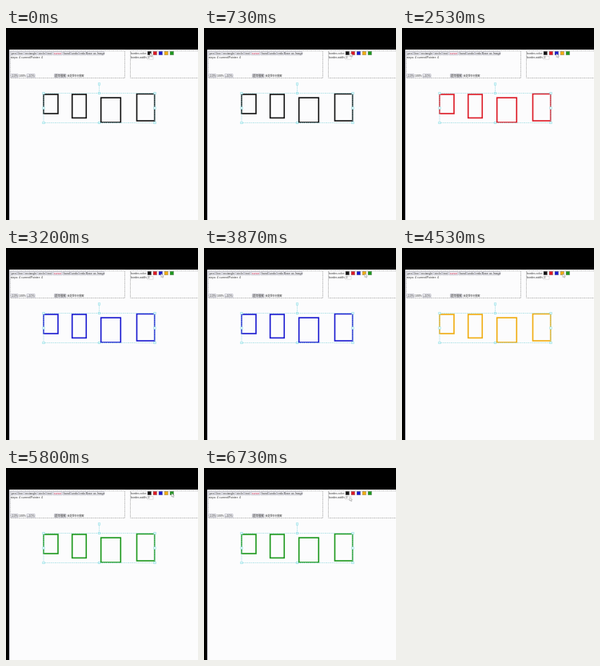
These frames come from a looping animation (240 by 240 pixels, 6790 ms). An HTML page:

```html
<!DOCTYPE html>
<html lang="en">
<head>
<meta charset="utf-8">
<style>
  html, body { margin: 0; width: 100%; height: 100%; overflow: hidden; background: #000; }
  svg { display: block; width: 100vw; height: 100vh; }
  text { font-family: "Liberation Sans", "Noto Sans CJK TC", "Noto Sans CJK", sans-serif; font-size: 3.5px; fill: #333; }
</style>
</head>
<body>
<svg id="stage" viewBox="0 0 240 240">
  <rect width="240" height="240" fill="#000"/>
  <rect x="4" y="27" width="236" height="213" fill="#fcfcfd"/>
  <g fill="none" stroke="#c8c8c8" stroke-width="1" stroke-dasharray="2 .5">
    <rect x="5.5" y="28.5" width="143" height="34"/>
    <path d="M240 28.5H155.5V62.5H240"/>
  </g>
  <path d="M4.5 27V240" stroke="#e2e2ee"/>
  <g id="panel"></g>
  <g id="shapes" fill="none" stroke-width="1.6"></g>
  <g id="selection"></g>
  <path id="pointer" d="M0 0V4.6L1.1 3.6L1.9 5.3L2.7 4.9L1.9 3.3H3.3Z" fill="#fff" stroke="#777" stroke-width=".4"/>
</svg>
<script>
const LOOP = 6790;
const $ = id => document.getElementById(id);

function add(parent, tag, attrs, content) {
  const node = document.createElementNS("http://www.w3.org/2000/svg", tag);
  for (const key in attrs) node.setAttribute(key, attrs[key]);
  if (content) node.textContent = content;
  parent.appendChild(node);
  return node;
}

const panel = $("panel");
const label = (x, y, content, attrs) => add(panel, "text", { x, y, ...attrs }, content);

function button(x, y, width, content, color = "#333") {
  add(panel, "rect", { x: x + .4, y: y + .4, width: width - .8, height: 4.4, rx: .6,
    fill: "#f2f2f6", stroke: "#9c9cac", "stroke-width": .5 });
  label(x + width / 2, y + 3.7, content, { "text-anchor": "middle", style: `fill:${color}` });
}

let toolX = 5.5;
[["pen", 8.5], ["line", 8.5], ["rectangle", 17], ["circle", 10.5], ["text", 8.5], ["cursor", 12],
 ["hand", 10.5], ["undo", 10], ["redo", 9.5], ["Save as Image", 22.5]].forEach(([name, width]) => {
  button(toolX, 29, width, name, name === "cursor" ? "#d03050" : "#333");
  toolX += width;
});
label(5.8, 37.6, "steps: 4 current/Pointer: 4");
button(6, 57, 9.5, "-10%");
label(16, 60.7, "100%");
button(25.5, 57, 11, "+10%");
button(60, 57, 15.5, "選擇檔案");
label(76.5, 60.7, "未選擇任何檔案", { style: "font-size:3px" });
label(156, 33.2, "border-color:");
label(156, 38, "border-width:");
add(panel, "rect", { x: 176.8, y: 35.3, width: 7.2, height: 3.8, fill: "#fff", stroke: "#bbb", "stroke-width": .4 });
label(177.6, 38.4, "2");

const colors = ["#101010", "#dc1824", "#1818d0", "#f0ac10", "#1c981c"];
colors.forEach((fill, i) => add(panel, "rect", {
  x: 177 + i * 7, y: 29.2, width: 4.6, height: 4.6, fill, stroke: "#888", "stroke-width": .4
}));

const shapes = $("shapes");
[[47, 83, 18, 24], [82.7, 83, 17.6, 29.4], [118.7, 87.2, 24.6, 30.8], [163.5, 82.4, 22.2, 33.6]]
  .forEach(([x, y, width, height]) => add(shapes, "rect", { x, y, width, height }));

const selection = $("selection");
add(selection, "path", { d: "M47 81.5H186V118.5H47ZM116.5 81.5V70", fill: "none",
  stroke: "#a6e0e6", "stroke-width": .7, "stroke-dasharray": "2 .6" });
for (const x of [47, 116.5, 186])
  for (const y of [81.5, 100, 118.5])
    if (x !== 116.5 || y !== 100) handle(x, y);
handle(116.5, 70);

function handle(x, y) {
  add(selection, "rect", { x: x - 1.2, y: y - 1.2, width: 2.4, height: 2.4,
    fill: "#f4ffff", stroke: "#8adce4", "stroke-width": .6 });
}

const changes = [0, 950, 2750, 4000, 5350];
// Pointer stops: time, x, y
const stops = [
  [0, 180, 31], [600, 180, 31], [900, 187, 31], [1700, 187, 31],
  [2500, 193, 32], [3400, 194, 32], [3900, 201, 32], [4700, 201, 32],
  [5250, 207, 31.5], [6000, 207, 31.5], [6500, 182, 36.5], [LOOP, 182, 36.5]
];

function pointerAt(time) {
  const i = stops.findIndex(stop => stop[0] > time);
  const [t0, x0, y0] = stops[i - 1], [t1, x1, y1] = stops[i];
  const p = (time - t0) / (t1 - t0), ease = p * p * (3 - 2 * p);
  return [x0 + (x1 - x0) * ease, y0 + (y1 - y0) * ease];
}

function render(time) {
  const index = changes.filter(start => start <= time).length - 1;
  shapes.setAttribute("stroke", colors[index]);
  $("pointer").setAttribute("transform", `translate(${pointerAt(time)})`);
}

function tick() {
  render(performance.now() % LOOP);
  requestAnimationFrame(tick);
}
tick();
</script>
</body>
</html>
```
